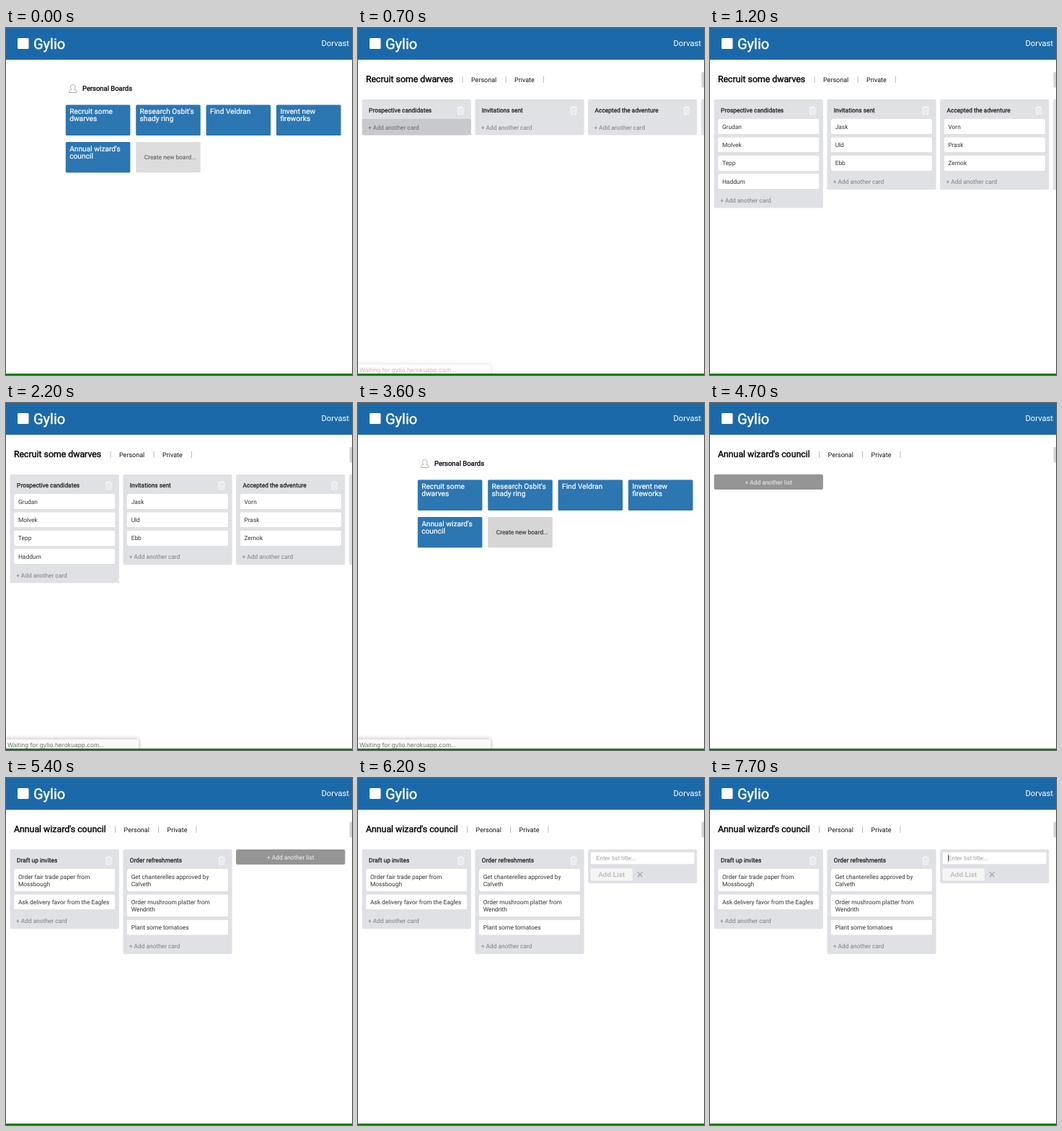
Write an HTML page that moves like this. It is 480 px wide and 481 px high and loops after 8000 ms.

```html
<!DOCTYPE html>
<html lang="en">
<head>
<meta charset="utf-8">
<title>Task boards</title>
<style>
html, body { margin: 0; height: 100%; overflow: hidden; background: #fff; }
svg { display: block; width: 100%; height: 100%; font-family: Roboto, sans-serif; text-rendering: geometricPrecision; }
.card { filter: drop-shadow(0 .8px .4px #0004); }
.bubble { filter: drop-shadow(0 0 3px #0005); }
</style>
</head>
<body>
<svg id="stage" viewBox="0 0 480 481"></svg>
<script>
const LOOP = 8000;
const stage = document.getElementById('stage');

const tiles = [
  ['Recruit some', 'dwarves'], ["Research Osbit's", 'shady ring'],
  ['Find Veldran'], ['Invent new', 'fireworks'], ["Annual wizard's", 'council']
];

// "at" is the time when the cards of a list arrive.
const recruit = {
  title: 'Recruit some dwarves', shift: 0, listsAt: 600,
  lists: [
    { name: 'Prospective candidates', at: 800, cards: [['Grudan'], ['Molvek'], ['Tepp'], ['Haddum']] },
    { name: 'Invitations sent', at: 900, cards: [['Jask'], ['Uld'], ['Ebb']] },
    { name: 'Accepted the adventure', at: 1200, cards: [['Vorn'], ['Prask'], ['Zemok']] },
    { name: '', at: 1200, cards: [[''], [''], ['']] }
  ]
};
const council = {
  title: "Annual wizard's council", shift: 6.6, listsAt: 4900,
  lists: [
    { name: 'Draft up invites', at: 5100, cards: [
      ['Order fair trade paper from', 'Mossbough'], ['Ask delivery favor from the Eagles']] },
    { name: 'Order refreshments', at: 5200, cards: [
      ['Get chanterelles approved by', 'Calveth'], ['Order mushroom platter from', 'Wendrith'],
      ['Plant some tomatoes']] }
  ]
};

const rect = (x, y, w, h, fill, r = 0, extra = '') =>
  `<rect x="${x}" y="${y}" width="${w}" height="${h}" rx="${r}" fill="${fill}" ${extra}/>`;
const text = (x, y, str, size, fill, bold = 0, extra = '') =>
  `<text x="${x}" y="${y}" font-size="${size}" fill="${fill}" stroke="${fill}" stroke-width="${bold}" ${extra}>${str}</text>`;
const line = (d, color, w) => `<path d="${d}" fill="none" stroke="${color}" stroke-width="${w}"/>`;

const header = () =>
  rect(0, 0, 480, 44, '#1c69aa') +
  rect(16, 14, 15.5, 15, '#fff', 1.5) +
  text(38, 28.6, 'Gylio', 20, '#fff', .45) +
  text(476, 25.2, 'Dorvast', 11.2, '#fff', 0, 'text-anchor="end"');

function home(t) {
  const late = t > 2000;
  let out =
    line('M87.5 89.5v-1.6q0-1.6 3.3-2.6q-1.4-1.8-1.2-4q.3-2.8 3.2-2.8t3.2 2.8q.2 2.2-1.2 4q3.4 1 3.4 2.6v1.6z', '#999', .8) +
    text(106, 86.9, 'Personal Boards', 9.45, '#000', .3);
  tiles.forEach((lines, i) => {
    const x = 82.8 + i % 4 * 97.4, y = i < 4 ? 106.6 : 158.1;
    out += rect(x, y, 89.6, 42.5, '#2c76b2', 1.5);
    lines.forEach((s, j) => out += text(x + 5.4, y + 12.8 + j * 9.9, s, 10.2, '#fff', .22));
  });
  return out + rect(180.2, 158.1, 89.6, 42.5, late ? '#d6d6d6' : '#dddddd', 1.5) +
    text(191.7, 182.3, 'Create new board...', 8.4, late ? '#333' : '#666', .15);
}

const trash = x => line(
  `M${x} 111h10M${x + 3} 111v-1.6h4v1.6M${x + 1.2} 111l.6 8.6h6.4l.6-8.6M${x + 3.7} 113v5M${x + 6.3} 113v5`, '#f8f8f9', 1.1);

function list({ name, at, cards }, x, t) {
  const loaded = t >= at;
  let y = 126, body = '';
  if (loaded) for (const lines of cards) {
    const h = lines.length > 1 ? 31 : 21.3;
    body += rect(x + 5.5, y, 140.5, h, '#fff', 2, 'class="card"');
    lines.forEach((s, j) => body += text(x + 11.3, y + 13.8 + j * 9.8, s, 8.4, '#333'));
    y += lines.length > 1 ? 35.2 : 25.3;
  }
  const hover = !loaded && x < 10 && t < 2000;
  return rect(x, 99, 151.3, y - 76.6, '#e0e1e5', 2) +
    (hover ? rect(x, 126, 151.3, 22.4, '#c8c9cc', 2) : '') +
    text(x + 9.5, 117.4, name, 8.4, '#222', .28) + trash(x + 131.8) + body +
    text(x + 8.3, y + 14.5, '+ Add another card', 8.4, hover ? '#666' : '#7c7d81');
}

const addList = x =>
  rect(x, 99, 151.3, 21, '#959595', 2) +
  text(x + 75.6, 112.5, '+ Add another list', 8.4, '#f4f4f4', 0, 'text-anchor="middle"');

function form(x, t) {
  const caret = t < 6200 || (t >= 6600 && t < 7200) || t >= 7700;
  return rect(x, 99, 151.3, 47, '#e0e1e5', 2) +
    rect(x + 4, 103, 143.5, 16.3, '#fff', 1.5) +
    text(x + 11.4, 114.2, 'Enter list title...', 8.4, '#a0a0a0') +
    (caret ? rect(x + 11, 106.3, .8, 9.6, '#333') : '') +
    rect(x + 3.5, 125.2, 58, 17.3, '#f5f5f6', 2) +
    text(x + 32.5, 137, 'Add List', 9.2, '#b9b9bb', 0,
      'text-anchor="middle" font-weight="bold" font-family="Liberation Sans, Arial, sans-serif"') +
    line(`M${x + 68.7} 130.4l6.8 6.8m0-6.8l-6.8 6.8`, '#96979b', 1.1);
}

function board({ title, shift, listsAt, lists }, t) {
  let out = text(11, 75.2, title, 12.3, '#000', .4) +
    text(157 + shift, 74.8, 'Personal', 9, '#111') +
    text(217 + shift, 74.8, 'Private', 9, '#111') +
    rect(476.5, 61, 20, 21.5, '#d3d3d6', 2);
  for (const x of [144.7, 204.7, 257]) out += rect(x + shift, 67, .8, 9.2, '#aaa');
  const shown = t >= listsAt ? lists : [];
  const slot = i => +(5.6 + i * 156.75).toFixed(2);
  shown.forEach((l, i) => out += list(l, slot(i), t));
  return out + (t >= 6000 ? form : addList)(slot(shown.length), t);
}

// Each pair gives a start time and the opacity of the status bubble.
const statusSteps = [[0, 0], [100, 1], [600, .8], [700, .45], [800, .15], [900, 0], [1900, .5], [2000, .9],
  [2200, 1], [3700, .6], [3800, .2], [3900, 0], [4200, 1], [4600, .4], [4700, 0]];

function status(t) {
  const alpha = statusSteps.findLast(([at]) => at <= t)[1];
  return alpha ? `<g opacity="${alpha}">` +
    rect(-4, 466.3, 188, 18, '#fbfbfb', 2, 'class="bubble"') +
    text(2, 476.6, 'Waiting for gylio.herokuapp.com...', 8.3, '#6c6c6c', 0, 'font-family="Inter, sans-serif"') + '</g>' : '';
}

function view(t) {
  const page = t < 200 || (t >= 3600 && t < 4300) ? home(t) : board(t < 3600 ? recruit : council, t);
  return rect(0, 0, 480, 481, '#fff') + header() + page + status(t) + rect(0, 479, 480, 2, '#087c10');
}

let last;
function tick(now) {
  const t = Math.floor(now % LOOP / 100) * 100;
  if (t !== last) stage.innerHTML = view(last = t);
  requestAnimationFrame(tick);
}
tick(performance.now());
</script>
</body>
</html>
```
